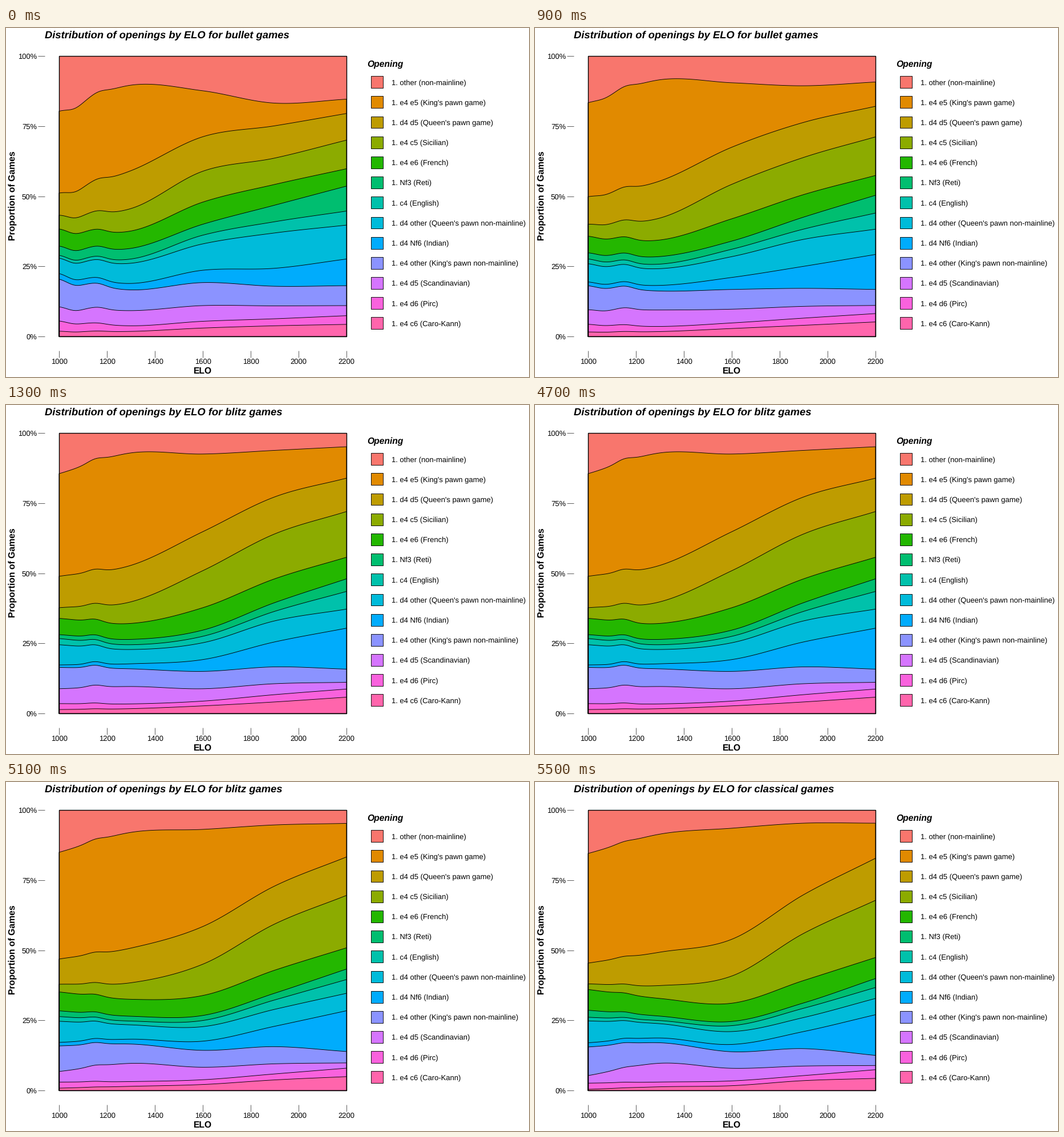
A matplotlib script that plays this animation: 917x611 px, repeating every 8 s.

```python
import numpy as np
import matplotlib.pyplot as plt
from matplotlib.animation import FuncAnimation
from matplotlib.patches import Polygon, Rectangle

W, H, DPI = 917, 611, 64
PT = 72 / DPI                      # points per pixel
LEFT, RIGHT, TOP, BOTTOM = 93, 597, 49, 540
FRAMES, INTERVAL, STEPS = 160, 50, 17

plt.rcParams["font.family"] = "Liberation Sans"
plt.rcParams["text.hinting"] = "none"

OPENINGS = [
    ("1. other (non-mainline)", "#F8766D"),
    ("1. e4 e5 (King's pawn game)", "#E18A00"),
    ("1. d4 d5 (Queen's pawn game)", "#BE9C00"),
    ("1. e4 c5 (Sicilian)", "#8CAB00"),
    ("1. e4 e6 (French)", "#24B700"),
    ("1. Nf3 (Reti)", "#00BE70"),
    ("1. c4 (English)", "#00C1AB"),
    ("1. d4 other (Queen's pawn non-mainline)", "#00BBDA"),
    ("1. d4 Nf6 (Indian)", "#00ACFC"),
    ("1. e4 other (King's pawn non-mainline)", "#8B93FF"),
    ("1. e4 d5 (Scandinavian)", "#D575FE"),
    ("1. e4 d6 (Pirc)", "#F962DD"),
    ("1. e4 c6 (Caro-Kann)", "#FF65AC"),
]

GRID = np.linspace(1000, 2200, 121)


def spline(keys):
    """Cubic Hermite curve through evenly spaced key values."""
    y = np.array(keys)
    m = np.gradient(y)
    pos = np.linspace(0, len(y) - 1, len(GRID))
    i = np.minimum(pos.astype(int), len(y) - 2)
    t = pos - i
    return (y[i] * (1 + 2 * t) * (1 - t) ** 2 + m[i] * t * (1 - t) ** 2
            + y[i + 1] * t * t * (3 - 2 * t) + m[i + 1] * t * t * (t - 1))


def boundaries(ripples, *rows):
    """Cumulative shares (%), top to bottom; ripples bend all rows alike."""
    y = np.array([spline(row) for row in rows])
    wave = sum(a * np.exp(-((GRID - c) / 45) ** 2) for a, c in ripples)
    return y + wave * np.tanh(y / 10)


# Key values at ratings 1000, 1300, 1600, 1900 and 2200.
bullet = boundaries(
    [(-1.4, 1065), (1.0, 1165)],
    (80.5, 89.6, 87.6, 83.2, 84.6),
    (51.3, 59.1, 71.2, 75.1, 79.5),
    (43.4, 45.6, 58.9, 63.6, 70.0),
    (38.5, 37.6, 47.9, 54.2, 59.8),
    (32.4, 31.4, 40.0, 46.8, 53.6),
    (29.1, 27.6, 36.1, 40.9, 44.7),
    (28.1, 26.1, 33.0, 36.9, 39.7),
    (22.6, 18.9, 23.6, 24.3, 27.6),
    (20.6, 16.6, 19.2, 17.9, 18.1),
    (10.7, 9.2, 11.0, 10.9, 11.0),
    (5.6, 3.8, 5.4, 6.3, 7.4),
    (1.9, 1.8, 3.0, 3.8, 4.3))
blitz = boundaries(
    [(1.1, 1150)],
    (85.5, 92.9, 92.5, 93.8, 95.1),
    (48.9, 52.8, 64.8, 77.2, 83.9),
    (37.7, 39.8, 50.9, 64.0, 72.0),
    (33.9, 32.1, 37.7, 48.0, 55.7),
    (28.1, 26.4, 29.7, 39.5, 48.0),
    (26.7, 24.5, 27.5, 36.4, 43.5),
    (24.5, 22.8, 25.2, 33.0, 37.2),
    (17.3, 17.7, 19.2, 25.5, 30.4),
    (16.4, 15.9, 15.0, 16.6, 15.8),
    (8.8, 9.6, 8.8, 10.6, 11.1),
    (3.5, 3.4, 4.4, 6.7, 8.7),
    (1.4, 1.7, 2.7, 4.1, 5.8))
classical = boundaries(
    [(0.5, 1150)],
    (84.5, 91.4, 93.5, 95.3, 95.3),
    (45.4, 49.3, 53.9, 69.8, 82.8),
    (38.0, 37.4, 40.8, 56.0, 67.8),
    (36.0, 32.8, 31.1, 39.2, 47.4),
    (28.6, 26.5, 24.6, 31.2, 39.9),
    (26.1, 24.9, 23.1, 29.3, 36.7),
    (24.8, 23.8, 21.0, 26.0, 32.8),
    (17.0, 18.7, 16.4, 21.0, 27.0),
    (15.5, 17.0, 13.8, 14.9, 12.5),
    (5.3, 9.7, 7.9, 8.7, 8.9),
    (2.6, 3.0, 3.4, 5.3, 7.4),
    (0.4, 1.3, 1.7, 3.5, 4.3))

STATES = [("bullet", bullet), ("blitz", blitz), ("classical", classical)]
STARTS = [9, 93]                   # last still frame before each change


def x_pix(elo):
    return LEFT + (elo - 1000) / 1200 * (RIGHT - LEFT)


def y_pix(pct):
    return BOTTOM - pct / 100 * (BOTTOM - TOP)


def ease(t):
    return 4 * t ** 3 if t < 0.5 else 1 - 4 * (1 - t) ** 3


fig = plt.figure(figsize=(W / DPI, H / DPI), dpi=DPI, facecolor="white")
ax = fig.add_axes([0, 0, 1, 1])
ax.set_xlim(0, W)
ax.set_ylim(H, 0)
ax.axis("off")


def label(x, y, s, px, **kw):
    return ax.text(x, y, s, fontsize=px * PT, color="black",
                   va="baseline", **kw)


def tick(x0, y0, x1, y1):
    ax.plot([x0, x1], [y0, y1], color="#4d4d4d", lw=0.9 * PT,
            solid_capstyle="butt")


# Axes
for pct in range(0, 101, 25):
    y = y_pix(pct)
    tick(55.5, y, 68, y)
    label(54, y + 5, f"{pct}%", 13, ha="right")
for elo in range(1000, 2201, 200):
    x = x_pix(elo)
    tick(x, 564.5, x, 577)
    label(x, 588, str(elo), 13, ha="center")
label(345, 605, "ELO", 15.6, ha="center", weight="bold")
label(16, 294, "Proportion of Games", 15.7, ha="center", weight="bold",
      rotation=90, rotation_mode="anchor")
title = label(68, 17.6, "", 18.34, weight="bold", style="italic")

# Legend
label(633, 67.5, "Opening", 15.6, weight="bold", style="italic")
for i, (name, color) in enumerate(OPENINGS):
    y = 94.7 + 35.18 * i
    ax.add_patch(Rectangle((640, y - 10.4), 20.8, 20.8, facecolor=color,
                           edgecolor="black", lw=0.9 * PT))
    label(676.5, y + 5.2, name, 12.95)

# Each area reaches the baseline and is covered by the next one.
xs = x_pix(GRID)
areas = []
for _, color in OPENINGS:
    area = Polygon([[LEFT, TOP], [RIGHT, TOP], [RIGHT, BOTTOM]],
                   facecolor=color, edgecolor="black", lw=0.9 * PT,
                   joinstyle="miter")
    areas.append(ax.add_patch(area))
ax.add_patch(Rectangle((LEFT, TOP), RIGHT - LEFT, BOTTOM - TOP, fill=False,
                       edgecolor="black", lw=1.4 * PT, zorder=3))


def update(frame):
    k = 1 if frame > STARTS[1] else 0
    step = min(max(frame - STARTS[k], 0), STEPS)
    (name_a, a), (name_b, b) = STATES[k], STATES[k + 1]
    shares = a + (b - a) * ease(step / STEPS)
    name = name_b if step > STEPS / 2 + 1 else name_a
    title.set_text(f"Distribution of openings by ELO for {name} games")
    rows = np.vstack([np.full(len(GRID), 100.0), shares])
    for area, row in zip(areas, rows):
        line = np.column_stack([xs, y_pix(row)])
        area.set_xy(np.vstack([line, [[RIGHT, BOTTOM], [LEFT, BOTTOM]]]))
    return [*areas, title]


anim = FuncAnimation(fig, update, frames=FRAMES, interval=INTERVAL,
                     repeat=True, repeat_delay=0, blit=False)
plt.show()
```
